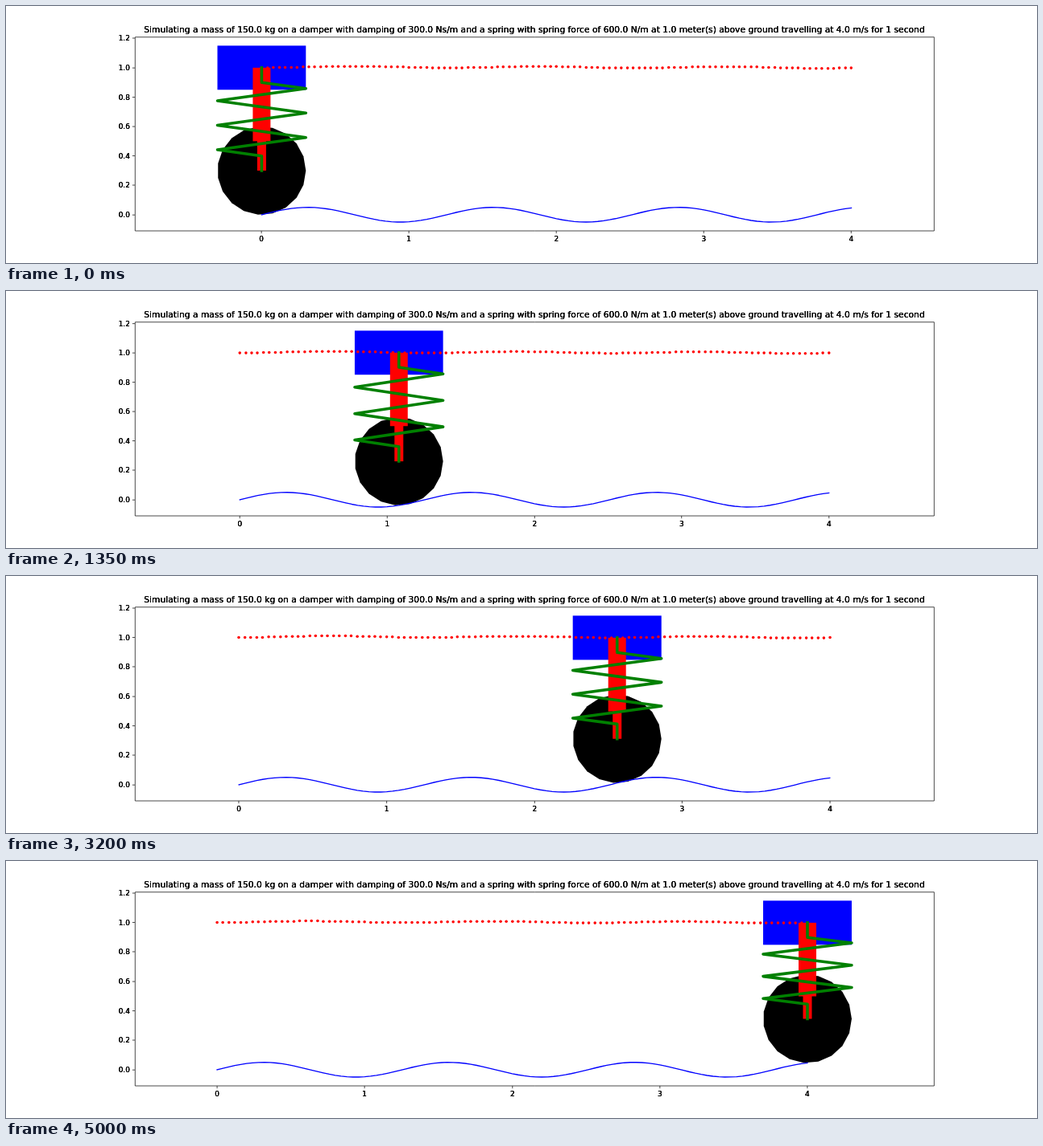
Write an HTML page with a canvas that moves like this. It is 1280 px wide and 320 px high and loops after 5.05 s.

```html
<!DOCTYPE html>
<html lang="en">
<head>
<meta charset="utf-8">
<title>Spring and damper on a wavy road</title>
<style>
html, body { margin: 0; height: 100%; overflow: hidden; background: #fff; }
canvas { display: block; }
</style>
</head>
<body>
<canvas width="1280" height="320"></canvas>
<script>
const ctx = document.querySelector('canvas').getContext('2d');
const TITLE = 'Simulating a mass of 150.0 kg on a damper with damping of 300.0 Ns/m and a spring with spring force of 600.0 N/m at 1.0 meter(s) above ground travelling at 4.0 m/s for 1 second';
const STEPS = 100, STEP_MS = 50, SPEED = 4;
// The plot is laid out on a 2000 x 500 figure and scaled to the stage.
const FIT = 0.64, PT = 100 / 72;
const LEFT = 250, RIGHT = 1800, TOP = 60, BOTTOM = 437.5;
const RADIUS = 0.3, SIDES = 19;

const road = x => 0.05 * Math.sin(5 * x);

// Height of the mass: decaying free response plus forced response.
function massHeight(x) {
  const t = x / SPEED, w = Math.sqrt(3);
  const free = Math.exp(-t) * (Math.cos(w * t) + Math.sin(w * t) / w);
  return 1 + 0.00505 * (free - Math.cos(20 * t));
}

const xs = Array.from({ length: STEPS + 1 }, (_, i) => SPEED * i / STEPS);
const snap = v => Math.floor(v) + 0.5;

function draw(step) {
  const x = xs[step], mass = massHeight(x), hub = RADIUS + road(x);

  // Equal axes fitted to the data with a 5% margin.
  const low = -0.05, high = mass + 0.15;
  const scale = (BOTTOM - TOP) / (1.1 * (high - low));
  const midX = (Math.min(0, x - RADIUS) + Math.max(SPEED, x + RADIUS)) / 2;
  const px = v => (LEFT + RIGHT) / 2 + (v - midX) * scale;
  const py = v => (TOP + BOTTOM) / 2 - (v - (low + high) / 2) * scale;

  const trace = points => {
    ctx.beginPath();
    points.forEach(([a, b]) => ctx.lineTo(px(a), py(b)));
  };
  const line = (points, color, width) => {
    trace(points);
    ctx.strokeStyle = color;
    ctx.lineWidth = width * PT;
    ctx.stroke();
  };
  const box = (half, bottom, top, color) => {
    ctx.fillStyle = color;
    ctx.fillRect(px(x - half), py(top), 2 * half * scale, (top - bottom) * scale);
  };

  ctx.setTransform(FIT, 0, 0, FIT, 0, 0);
  ctx.fillStyle = '#fff';
  ctx.fillRect(0, 0, 2000, 500);
  ctx.lineJoin = 'round';
  ctx.lineCap = 'square';

  ctx.save();
  ctx.beginPath();
  ctx.rect(LEFT, TOP, RIGHT - LEFT, BOTTOM - TOP);
  ctx.clip();

  trace(Array.from({ length: SIDES }, (_, i) => {
    const a = 2 * Math.PI * i / SIDES;
    return [x + RADIUS * Math.cos(a), hub + RADIUS * Math.sin(a)];
  }));
  ctx.fillStyle = '#000';
  ctx.fill();

  box(0.3, mass - 0.15, mass + 0.15, '#00f');
  box(0.03, hub, mass - 0.4, '#f00');
  box(0.06, mass - 0.5, mass, '#f00');

  line(xs.map(v => [v, road(v)]), '#00f', 1.5);

  ctx.fillStyle = '#f00';
  for (const v of xs) {
    ctx.beginPath();
    ctx.arc(snap(px(v)), snap(py(massHeight(v))), 2 * PT, 0, 7);
    ctx.fill();
  }

  const upper = mass - 0.1, gap = (upper - hub - 0.1) / 6;
  const coils = [];
  for (let i = 0; i < 6; i++) {
    coils.push([x + (i % 2 ? -0.3 : 0.3), upper - gap * (i + 0.5)]);
  }
  line([[x, mass], [x, upper], ...coils, [x, hub + 0.1], [x, hub]], '#008000', 4);
  ctx.restore();

  drawAxes(px, py);
}

// Repeated strokes give the text its dense edges.
function label(text, x, y, size, align) {
  ctx.font = `${size}px "DejaVu Sans", sans-serif`;
  ctx.textAlign = align;
  for (let i = 0; i < 3; i++) ctx.fillText(text, x, y);
}

function tick(x, y, dx, dy) {
  ctx.beginPath();
  ctx.moveTo(x, y);
  ctx.lineTo(x + dx, y + dy);
  ctx.stroke();
}

function drawAxes(px, py) {
  const len = 3.5 * PT, size = 10 * PT;
  ctx.strokeStyle = ctx.fillStyle = '#000';
  ctx.lineWidth = 0.8 * PT;
  ctx.lineCap = 'butt';
  ctx.strokeRect(snap(LEFT), snap(TOP), RIGHT - LEFT, snap(BOTTOM) - snap(TOP));
  for (let v = 0; v <= 4; v++) {
    const x = snap(px(v));
    tick(x, snap(BOTTOM), 0, len);
    label(String(v), x, BOTTOM + 2 * len + 0.73 * size, size, 'center');
  }
  for (let i = 0; i <= 6; i++) {
    const y = snap(py(i / 5));
    tick(LEFT, y, -len, 0);
    label((i / 5).toFixed(1), LEFT - 2 * len, y + 0.365 * size, size, 'right');
  }
  label(TITLE, (LEFT + RIGHT) / 2, TOP - 6 * PT, 16.73, 'center');
}

function frame() {
  draw(Math.floor(performance.now() / STEP_MS) % (STEPS + 1));
  requestAnimationFrame(frame);
}
frame();
</script>
</body>
</html>
```
